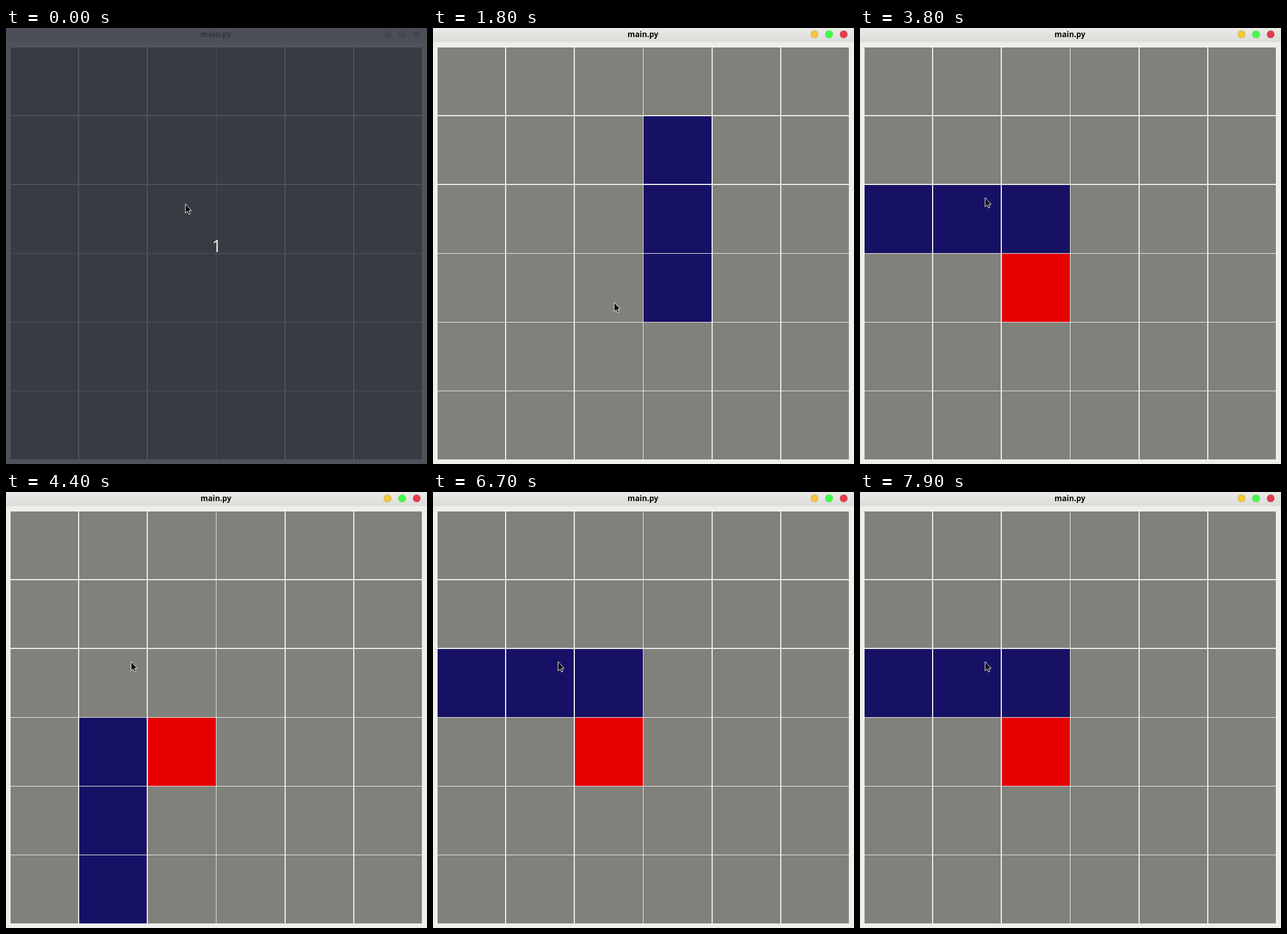
These frames come from a looping animation (736 px wide and 761 px high, 8 s). An HTML page:

```html
<!DOCTYPE html>
<html lang="en">
<head>
<meta charset="utf-8">
<title>main.py</title>
<style>
html, body { margin: 0; width: 100%; height: 100%; overflow: hidden; }
svg { display: block; width: 100vw; height: 100vh; }
text { font-family: "Open Sans", "Noto Sans", sans-serif; text-anchor: middle; }
</style>
</head>
<body>
<svg viewBox="0 0 736 761">
  <defs>
    <linearGradient id="shade" x2="0" y2="1">
      <stop stop-color="#eaebe8"/>
      <stop offset="1" stop-color="#dcddd8"/>
    </linearGradient>
  </defs>
  <rect id="frame" width="736" height="761"/>
  <rect id="bar" width="736" height="24.5"/>
  <text id="title" x="367" y="16" font-size="13.4" font-weight="700">main.py</text>
  <g id="buttons" stroke="#000" stroke-opacity=".12"></g>
  <g id="board" shape-rendering="crispEdges"></g>
  <text id="count" x="368.3" y="391" font-size="28.5" fill="#f0f0ea">1</text>
  <path id="cursor" d="M.7 1V17.2L4.3 13.9L6.7 19.2L9.2 18.1L6.9 12.9H11.4Z"
        fill="#0c0c0c" stroke="#fff" stroke-width=".95"/>
</svg>
<script>
const LOOP = 8000, SIZE = 6, STEP = 120.05;
const FOCUS = 900, PIVOT_AT = 2300;
const BLUE = '#171166', RED = '#e60000';
const pivot = { col: 2, row: 3 };
const lights = ['#f3c63a', '#42fc49', '#e63c50'];

const dim = { frame: '#50535b', bar: '#4c4f57', title: '#34363d', cell: '#393b43', button: '#44474f' };
const idle = { frame: '#eeefea', bar: '#e2e4df', title: '#8b8d88', cell: '#80817b', button: '#c6c8c2' };
const active = { ...idle, bar: 'url(#shade)', title: '#0a0a0a', button: null };

const $ = id => document.getElementById(id);
const fill = (el, color) => el.setAttribute('fill', color);
const clamp = u => Math.max(0, Math.min(1, u));
const mix = (a, b, u) => a.map((v, i) => v + (b[i] - v) * u);
// Time since start, held for each tick
const held = (t, start, tick) => Math.floor((t - start) / tick) * tick;
const rowTop = row => 34 + STEP * row;

function add(parent, tag, attrs) {
  const el = document.createElementNS('http://www.w3.org/2000/svg', tag);
  for (const key in attrs) el.setAttribute(key, attrs[key]);
  return $(parent).appendChild(el);
}

const buttons = lights.map((_, i) => add('buttons', 'circle', { cx: 667 + 25.5 * i, cy: 11, r: 6.6 }));
const cells = Array.from({ length: SIZE * SIZE }, (_, i) => add('board', 'rect', {
  x: 8 + 120.15 * (i % SIZE), y: rowTop(Math.floor(i / SIZE)), width: 118.3, height: 118.4
}));

// Accelerating downward stroke that paints the column
function drag(t) {
  const u = clamp(held(t, 700, 200) / 800);
  return mix([388, 228], [422, 474], 0.45 * u + 0.55 * u ** 3);
}

function pointer(t) {
  if (t < 400) return [313, 306];
  if (t < 700) return [365, 240];
  if (t < 1800) return drag(t);
  return mix([316, 478], [218, 295], clamp(held(t, 2500, 100) / 300));
}

// Clockwise quarter turns about the pivot
function quarterTurns(t) {
  if (t >= 6100) return (5 - Math.min(2, held(t, 6100, 300) / 300 % 4)) % 4;
  if (t >= 4400) return 2;
  if (t < 3200) return 0;
  return t >= 3800 && t < 4200 ? 3 : 1;
}

function draw(t) {
  const look = t < 400 ? dim : t < FOCUS ? idle : active;
  for (const id of ['frame', 'bar', 'title']) fill($(id), look[id]);
  buttons.forEach((b, i) => fill(b, look.button || lights[i]));
  $('buttons').setAttribute('stroke', look.button || '#000');
  $('count').setAttribute('visibility', look === dim ? 'visible' : 'hidden');

  for (const cell of cells) fill(cell, look.cell);
  const paint = (x, y, color) => fill(cells[(pivot.row + y) * SIZE + pivot.col + x], color);
  const reach = drag(t)[1], turns = quarterTurns(t);
  for (let row = 1; t >= FOCUS && row <= 3 && rowTop(row) <= reach; row++) {
    let x = 1, y = row - pivot.row;
    for (let i = 0; i < turns; i++) [x, y] = [-y, x];
    paint(x, y, BLUE);
  }
  if (t >= PIVOT_AT) paint(0, 0, RED);

  $('cursor').setAttribute('transform', `translate(${pointer(t)})`);
}

const start = performance.now();
function tick() {
  draw((performance.now() - start) % LOOP);
  requestAnimationFrame(tick);
}
tick();
</script>
</body>
</html>
```
